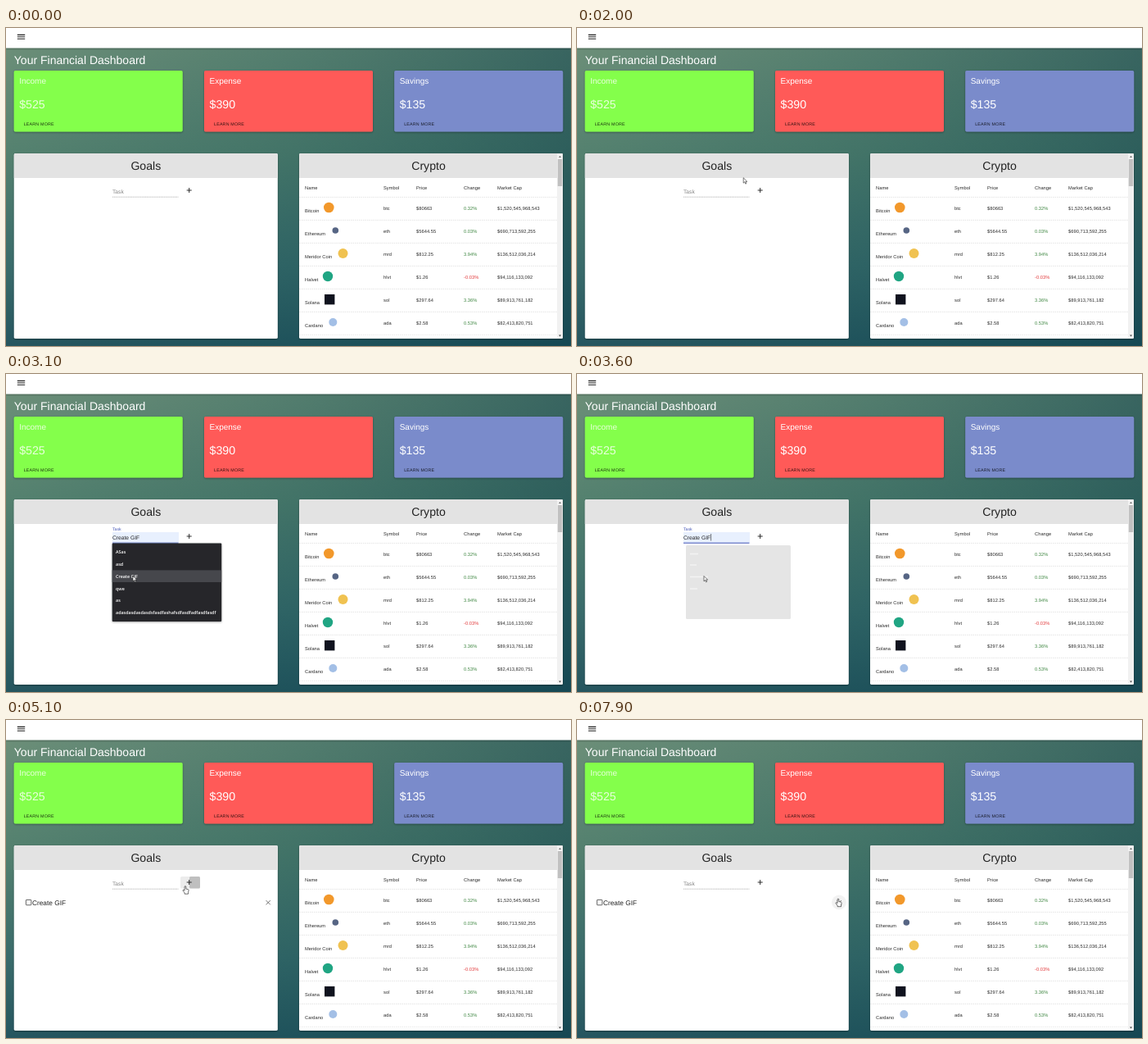
Recreate the animation shown at these times as an HTML page. Size 690x388 px, loop 8 s.

```html
<!DOCTYPE html>
<html lang="en">
<head>
<meta charset="utf-8">
<title>Financial Dashboard</title>
<style>
html, body { margin: 0; width: 100%; height: 100%; overflow: hidden; }
svg { display: block; width: 690px; height: 388px; }
text { font-family: "Liberation Sans", Arial, sans-serif; text-rendering: geometricPrecision; white-space: pre; }
.menu text { font-family: "Open Sans", sans-serif; font-weight: 600; }
</style>
</head>
<body>
<svg id="stage" viewBox="0 0 690 388" xmlns="http://www.w3.org/2000/svg">
  <defs>
    <linearGradient id="sky" x1="0" y1="0" x2="0" y2="1">
      <stop offset="0" stop-color="#70917a"/>
      <stop offset=".4" stop-color="#54816f"/>
      <stop offset=".75" stop-color="#396b6b"/>
      <stop offset="1" stop-color="#25555f"/>
    </linearGradient>
    <linearGradient id="shade">
      <stop offset="0" stop-color="#0b4a50" stop-opacity="0"/>
      <stop offset=".45" stop-color="#0b4a50" stop-opacity=".22"/>
      <stop offset="1" stop-color="#063b48" stop-opacity=".5"/>
    </linearGradient>
    <filter id="drop" x="-5%" y="-10%" width="110%" height="125%">
      <feDropShadow dx="0" dy=".8" stdDeviation=".8" flood-opacity=".4"/>
    </filter>
  </defs>
  <rect width="690" height="388" fill="url(#sky)"/>
  <rect width="690" height="388" fill="url(#shade)"/>
  <g id="page"></g>

  <g id="field">
    <rect id="fill" x="130" y="193" width="81" height="13" fill="#e8f0fe"/>
    <path id="line" d="M130 206.2H210.5"/>
    <text id="label">Task</text>
    <text id="value" x="130" y="201.8" font-size="6.7" fill="#222">Create GIF</text>
    <path id="caret" d="M163.6 195V203.5" stroke="#222" stroke-width=".6"/>
  </g>
  <g id="press">
    <rect x="213" y="191" width="24" height="14.5" rx="1.5" fill="#ececec"/>
    <rect x="224" y="191" width="13" height="14.5" rx="1.5" fill="#bfbfbf"/>
  </g>
  <path d="M220.7 198H226.7M223.7 195V201" stroke="#222" stroke-width=".95"/>

  <g id="item">
    <rect id="box" x="24.4" y="219.4" width="6.4" height="6.4" rx=".5" stroke-width=".9"/>
    <path id="tick" d="M25.6 222.6L27.1 224.1L29.9 221" fill="none" stroke="#fff" stroke-width=".9"/>
    <text x="32" y="225.6" font-size="8.3" fill="#222">Create GIF</text>
    <path id="strike" d="M31.5 222.7H73.3" stroke="#222" stroke-width=".8"/>
    <circle id="halo" cx="320" cy="222.5" r="9" fill="#000" opacity=".05"/>
    <path d="M317.6 220.1L322.8 225.3M322.8 220.1L317.6 225.3" stroke="#666" stroke-width=".9"/>
  </g>

  <g id="ghost">
    <rect x="133" y="209" width="128" height="90" rx="1.5" fill="#e5e5e5"/>
    <path d="M138 219.5H148M138 233H146M138 247.5H160M138 262H147" stroke="#f3f3f3" stroke-width="1.6"/>
  </g>
  <g id="menu" class="menu"></g>

  <g id="cursor">
    <path id="arrow" d="M0 0V6.4L1.5 5L2.6 7.4L3.7 6.9L2.6 4.6H4.6Z" fill="#fff" stroke="#222" stroke-width=".6"/>
    <path id="hand" d="M-.9 .6Q0 -.5 .8 .6V3.6L3.4 4.1Q4.2 4.4 4.1 5.3L3.5 8V9.7H-.9V8.4L-3 5.6Q-3 4.3 -1.8 4.8L-.9 5.7Z" fill="#fff" stroke="#222" stroke-width=".65"/>
  </g>
</svg>
<script>
const LOOP = 8000;
const $ = id => document.getElementById(id);
const text = (x, y, size, fill, str, more = '') =>
  `<text x="${x}" y="${y}" font-size="${size}" fill="${fill}" ${more}>${str}</text>`;
const rect = (x, y, w, h, fill, more = '') =>
  `<rect x="${x}" y="${y}" width="${w}" height="${h}" fill="${fill}" ${more}/>`;
const dot = (x, y, r, fill) => `<circle cx="${x}" cy="${y}" r="${r}" fill="${fill}"/>`;

function card(x, fill, name, sum, ink) {
  return rect(x, 52, 206, 74.5, fill, 'rx="1.7" filter="url(#drop)"') +
    text(x + 6.5, 68.2, 10, ink, name) +
    text(x + 6.5, 98, 14.2, ink, sum) +
    text(x + 12, 119.1, 5.3, '#000', 'LEARN MORE', 'letter-spacing=".2" opacity=".82"');
}

function panel(x, title) {
  return rect(x, 153, 322, 226, '#fff', 'rx="1.7" filter="url(#drop)"') +
    `<path d="M${x} 183V154.7Q${x} 153 ${x + 1.7} 153H${x + 320.3}Q${x + 322} 153 ${x + 322} 154.7V183Z" fill="#e3e3e3"/>` +
    text(x + (x < 100 ? 161 : 158), 173.2, 14.1, '#222', title, 'text-anchor="middle"');
}

const cols = [365, 461, 501, 559, 600];
const coins = [
  ['Bitcoin', 'btc', '$80663', '0.32%', '$1,520,545,968,543', dot(394.3, 219, 6.3, '#f2982b')],
  ['Ethereum', 'eth', '$5644.55', '0.03%', '$690,713,592,255', dot(402.3, 247, 3.8, '#566584')],
  ['Meridor Coin', 'mrd', '$812.25', '3.94%', '$136,512,036,214', dot(411.5, 275, 6, '#f0c251')],
  ['Halvet', 'hlvt', '$1.26', '-0.03%', '$94,116,133,092', dot(393, 303, 6.2, '#20a583')],
  ['Solana', 'sol', '$297.64', '3.36%', '$89,913,761,182', rect(389, 325, 12.4, 12.4, '#10131f')],
  ['Cardano', 'ada', '$2.58', '0.53%', '$82,413,820,751', dot(399.3, 359, 5, '#a3bfe6')]
];
const cell = (i, y, str, fill = '#2a2a2a') =>
  text(cols[i], y, 5.7, fill, str, 'letter-spacing=".06"');

function table() {
  let out = ['Name', 'Symbol', 'Price', 'Change', 'Market Cap'].map((s, i) => cell(i, 196.8, s)).join('');
  coins.forEach((row, r) => {
    const y = 222.4 + r * 28;
    out += `<path d="M358.5 ${206.4 + r * 28}H673" stroke="#d9d9d9" stroke-width=".7" stroke-dasharray="1.5 1"/>`;
    out += row[5];
    row.slice(0, 5).forEach((s, i) => {
      const fill = i === 3 ? (s[0] === '-' ? '#e2393b' : '#3d8540') : '#2a2a2a';
      out += cell(i, i ? y : y + 3, s, fill);
    });
  });
  return out + '<path d="M358.5 374.4H673" stroke="#e0e0e0" stroke-width=".7" stroke-dasharray="1.5 1"/>';
}

function scrollbar() {
  return rect(673, 153.5, 6.8, 225, '#f1f1f1') + rect(673.8, 160, 5.4, 33, '#c1c1c1') +
    '<path d="M675 158L676.5 156L678 158Z" fill="#666"/><path d="M675 374.5L676.5 376.5L678 374.5Z" fill="#444"/>';
}

$('page').innerHTML =
  rect(0, 0, 690, 24.4, '#fff', 'filter="url(#drop)"') +
  '<path d="M13.8 8.4H23.2M13.8 10.8H23.2M13.8 13.2H23.2" stroke="#222" stroke-width="1.05"/>' +
  text(9.8, 44, 14, '#fff', 'Your Financial Dashboard') +
  card(9.7, '#84ff4c', 'Income', '$525', '#e9ffdd') +
  card(242, '#ff5a58', 'Expense', '$390', '#fff') +
  card(474.2, '#7a8bcb', 'Savings', '$135', '#fff') +
  panel(9.8, 'Goals') + panel(358, 'Crypto') + table() + scrollbar();

const options = ['ASas', 'asd', 'Create GIF', 'qwe', 'as', 'adasdasdasdasdsfasdfashafsdfasdfadfasdfasdf'];
$('menu').innerHTML =
  rect(129.7, 206.5, 133.5, 95.5, '#27282c', 'rx="1" filter="url(#drop)"') +
  rect(129.7, 239.4, 133.5, 14.6, '#46474c', 'id="hover"') +
  options.map((s, i) => text(134, 219.2 + i * 14.8, 5.4, '#fff', s)).join('');

// time, x, y of the pointer tip
const path = [
  [900, 322, 62], [1300, 283.5, 138.5], [1950, 205, 182], [2350, 163, 200], [2700, 161, 207],
  [3100, 155, 246.5], [3700, 155, 246.5], [4350, 219, 202.5], [5300, 219, 202.5],
  [6050, 28, 222.5], [6950, 28, 222.5], [7600, 319, 218], [8000, 319, 218]
];
const clamp = v => Math.max(0, Math.min(1, v));
const ease = v => v * v * (3 - 2 * v);
const ramp = (t, a, b) => ease(clamp((t - a) / (b - a)));
const between = (t, a, b) => t >= a && t < b;
const mix = (a, b, k) => a + (b - a) * k;

function pointer(t) {
  const i = Math.max(1, path.findIndex(p => p[0] > t));
  const [a, b] = [path[i - 1], path[i]];
  const k = ramp(t, a[0], b[0]);
  return [mix(a[1], b[1], k), mix(a[2], b[2], k)];
}

function show(id, on) {
  $(id).setAttribute('opacity', +on);
}
function set(id, attrs) {
  for (const k in attrs) $(id).setAttribute(k, attrs[k]);
}

function draw(t) {
  const focus = between(t, 2400, 4600);
  const filled = between(t, 3000, 4700);
  const up = ramp(t, 2400, 2600) * (1 - ramp(t, 4700, 4900));
  set('label', {
    x: 130, y: mix(201.8, 191, up), 'font-size': mix(6.7, 5.1, up),
    fill: focus ? '#3f51b5' : '#858585'
  });
  set('line', {
    stroke: focus ? '#3f51b5' : '#8c8c8c',
    'stroke-width': focus ? 1 : .6,
    'stroke-dasharray': focus ? 'none' : '1.2 .7'
  });
  show('fill', filled);
  show('value', filled);
  show('caret', between(t, 3400, 4600) && (t - 3400) % 1000 < 500);

  show('menu', between(t, 2500, 3400));
  show('hover', between(t, 3000, 3400));
  show('ghost', t < 3400 ? 0 : 1 - ramp(t, 3650, 3950));
  show('press', ramp(t, 4300, 4600) * (1 - ramp(t, 5300, 5550)));

  const done = between(t, 6300, 6950);
  show('item', t >= 4700);
  set('box', { fill: done ? '#f50057' : '#fff', stroke: done ? '#f50057' : '#555' });
  show('tick', done);
  show('strike', done);
  show('halo', .05 * ramp(t, 7450, 7650));

  const hand = between(t, 4250, 5400) || between(t, 5980, 7030) || t >= 7520;
  const [x, y] = pointer(t);
  set('cursor', { transform: `translate(${x.toFixed(2)} ${y.toFixed(2)})` });
  show('cursor', t >= 900);
  show('arrow', !hand);
  show('hand', hand);
}

let start;
function tick(now) {
  if (start === undefined) start = now;
  draw((now - start) % LOOP);
  requestAnimationFrame(tick);
}
draw(0);
requestAnimationFrame(tick);
</script>
</body>
</html>
```
